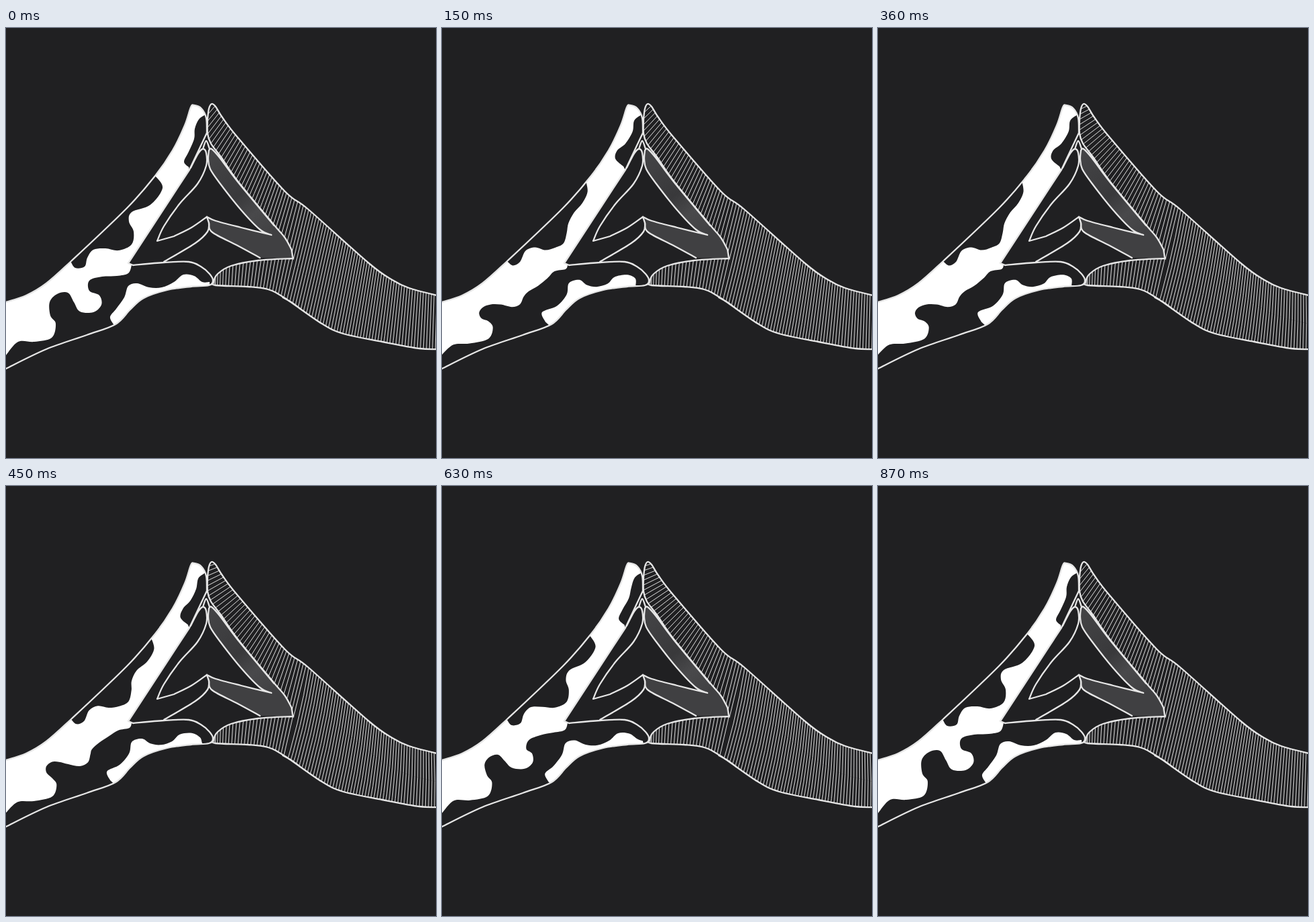
Animation of 640 by 640 pixels, one loop 0.9 s. Source, as an HTML page:

```html
<!DOCTYPE html>
<html lang="en">
<head>
<meta charset="utf-8">
<title>Hands</title>
<style>
  html, body { margin: 0; height: 100%; overflow: hidden; background: #202022; }
  svg { display: block; width: 100vw; height: 100vh; }
  #patches { fill: #202022; }
  #hatch { fill: none; stroke: #dedede; stroke-width: 1; }
  #outlines { fill: none; stroke: #e6e6e6; stroke-width: 2.3; stroke-linejoin: round; stroke-linecap: round; }
</style>
</head>
<body>
<svg viewBox="0 0 640 640">
  <defs>
    <clipPath id="leftClip"><path id="leftArea"/></clipPath>
    <clipPath id="rightClip"><path id="rightArea"/></clipPath>
    <linearGradient id="shade" gradientUnits="userSpaceOnUse" x1="303" y1="180" x2="400" y2="310">
      <stop offset="0" stop-color="#454547"/>
      <stop offset=".5" stop-color="#39393b"/>
      <stop offset=".72" stop-color="#49494b"/>
      <stop offset="1" stop-color="#404042"/>
    </linearGradient>
  </defs>
  <g id="patches" clip-path="url(#leftClip)">
    <rect width="640" height="640" fill="#fff"/>
    <path id="tip"/>
    <path id="back"/>
    <path id="palm"/>
    <path id="thumb" fill="#fff"/>
  </g>
  <path id="fingerShade" fill="url(#shade)"/>
  <path id="lowerShade" fill="#404042"/>
  <path id="hatch" clip-path="url(#rightClip)"/>
  <path id="outlines"/>
</svg>
<script>
const el = id => document.getElementById(id);
const setPath = (id, d) => el(id).setAttribute('d', d);
const parse = text => text.trim().split(/\s+/).map(pair => pair.split(',').map(Number));
const mix = (a, b, f) => a + (b - a) * f;

// Smooth curve through points; "|" in the text makes a corner.
function smooth(p, start = 'M') {
  let d = start + p[0];
  for (let i = 0; i < p.length - 1; i++) {
    const a = p[i - 1] || p[i], b = p[i], c = p[i + 1], e = p[i + 2] || c;
    const c1 = b.map((v, k) => v + (c[k] - a[k]) / 6);
    const c2 = c.map((v, k) => v - (e[k] - b[k]) / 6);
    d += `C${c1} ${c2} ${c}`;
  }
  return d;
}
const curve = text => text.split('|').map((s, i) => smooth(parse(s), i ? 'L' : 'M')).join('');

const leftHand = curve(`-5,410 0,408 30,398 60,380 97,347 180,268 222,220 248,182 266,145 275,118 280,115 291,120 298,134 299,156
  | 273,211 | 182,350 | 189,353 235,349 272,348 290,355 303,366 308,376 302,383 275,385 240,390 205,402 185,419 163,441
  120,457 60,478 0,507 -5,510`) + 'Z';
const topEdge = curve('300,135 302,120 306,113 312,117 322,133 345,163 415,243 450,270 540,350 575,375 600,387 645,399');
const thumbEdge = curve('310,375 315,366 335,354 375,346 427,343');
const rightHand = topEdge + curve(`645,478 615,477 560,467 502,455 470,440 415,402 390,389 360,385 312,383
  309,378 315,366 335,354 375,346 427,343 | 425,330 415,312 398,292 345,228 320,192 305,172 300,157 300,135`).replace('M', 'L') + 'Z';
const upperFinger = '302,182 306,180 318,193 345,229 399,294';
const upperInner = '395,308 378,300 350,271 319,232 304,210 301,195 302,182';
const lowerTop = '299,281 312,287 350,297 395,308';
const lowerInner = '378,342 345,324 307,304 302,290 299,281';

setPath('leftArea', leftHand);
setPath('rightArea', rightHand);
setPath('fingerShade', curve(`${upperFinger} | 421,320 395,308 | ${upperInner}`));
setPath('lowerShade', curve(`${lowerTop} | 399,294 415,312 425,330 427,343 | ${lowerInner}`));
setPath('outlines', leftHand + rightHand + [
  upperFinger, upperInner, lowerTop, lowerInner,
  '275,208 286,187 293,180 298,186 298,205 285,232 258,262 235,295 225,317 | 250,310 276,297 299,281 | 302,290 300,303 282,320 235,348',
  '293,180 298,168 303,180', '412,401 426,409 438,418'
].map(curve).join(''));

// Each patch flows between a resting and a stretched edge; `close` completes it outside the hand.
const patches = {
  tip: {
    rest: '297,129 287,136 281,150 280,165 272,184 265,199 272,207',
    far: '297,129 286,138 284,155 272,173 259,182 257,194 270,206',
    close: 'L273,212L320,190L320,120Z'
  },
  back: {
    rest: '222,220 233,238 215,263 187,274 183,288 190,303 187,322 168,331 148,328 130,330 121,342 117,355 103,357 96,347',
    far: '213,229 214,245 208,260 198,275 189,291 185,305 180,320 169,326 155,331 140,326 125,330 116,347 106,353 97,347',
    close: 'L80,340L200,210Z'
  },
  palm: {
    rest: `187,353 182,365 165,369 143,370 124,376 124,391 139,398 142,412 130,423 110,422 101,408 92,394 76,396
      65,408 66,428 74,440 68,461 42,467 18,467 0,487`,
    far: `187,353 184,358 168,361 159,373 146,385 130,392 119,400 112,411 100,414 84,410 68,412 56,419 52,428
      58,436 70,438 76,447 69,463 41,470 17,472 0,486`,
    close: 'L-9,530L320,420L320,340Z'
  },
  thumb: {
    rest: '303,378 292,378 280,369 264,367 250,378 232,386 213,386 195,380 182,384 176,401 164,418 155,430 160,441',
    far: '286,384 287,372 275,367 256,371 246,381 230,385 216,382 206,374 190,379 187,396 172,413 148,422 153,437',
    close: 'L168,450L250,410L303,400Z'
  }
};
for (const patch of Object.values(patches)) {
  patch.rest = parse(patch.rest);
  patch.far = parse(patch.far);
}

// Points along an edge, spaced by `ease`.
function along(d, count, ease = u => u) {
  const path = document.createElementNS('http://www.w3.org/2000/svg', 'path');
  path.setAttribute('d', d);
  const total = path.getTotalLength();
  return Array.from({ length: count }, (_, i) => {
    const u = ease(i / (count - 1)), { x, y } = path.getPointAtLength(u * total);
    return { x, y, u };
  });
}
const topStarts = along(topEdge, 96, u => 1.2 * u - .2 * u * u);
const thumbStarts = along(thumbEdge, 25);

function stroke({ x, y }, degrees, length, bow = 0) {
  const a = degrees * Math.PI / 180, dx = -Math.cos(a) * length, dy = Math.sin(a) * length;
  return `M${x} ${y}q${dx / 2 + bow} ${dy / 2} ${dx} ${dy}`;
}

// Strokes fan from the fingertip angle to upright at the wrist.
function hatch(swing) {
  const top = topStarts.map(p => {
    const turn = Math.min(1, p.u / .47) ** .75;
    const angle = mix(42 - 44 * swing, 76, turn) + 36 * Math.max(0, p.u - .4) ** 2;
    return stroke(p, angle, p.x < 447 ? 80 : 170, p.u > .5 ? 7 * swing : 0);
  });
  const thumb = thumbStarts.map(p => stroke(p, 90 - 13 * p.u, 90));
  return top.concat(thumb).join('');
}

function draw(now) {
  const step = Math.floor(now % 900 / 30);
  const p = step / 29;
  const flow = Math.sin(Math.PI * p ** .55) ** 2;
  const swing = Math.sin(Math.PI * p ** 1.6);
  for (const [id, { rest, far, close }] of Object.entries(patches)) {
    const points = rest.map((a, j) => a.map((v, k) => mix(v, far[j][k], flow)));
    setPath(id, smooth(points) + close);
  }
  setPath('hatch', hatch(swing));
}

const begin = performance.now();
function tick() {
  draw(performance.now() - begin);
  requestAnimationFrame(tick);
}
tick();
</script>
</body>
</html>
```
